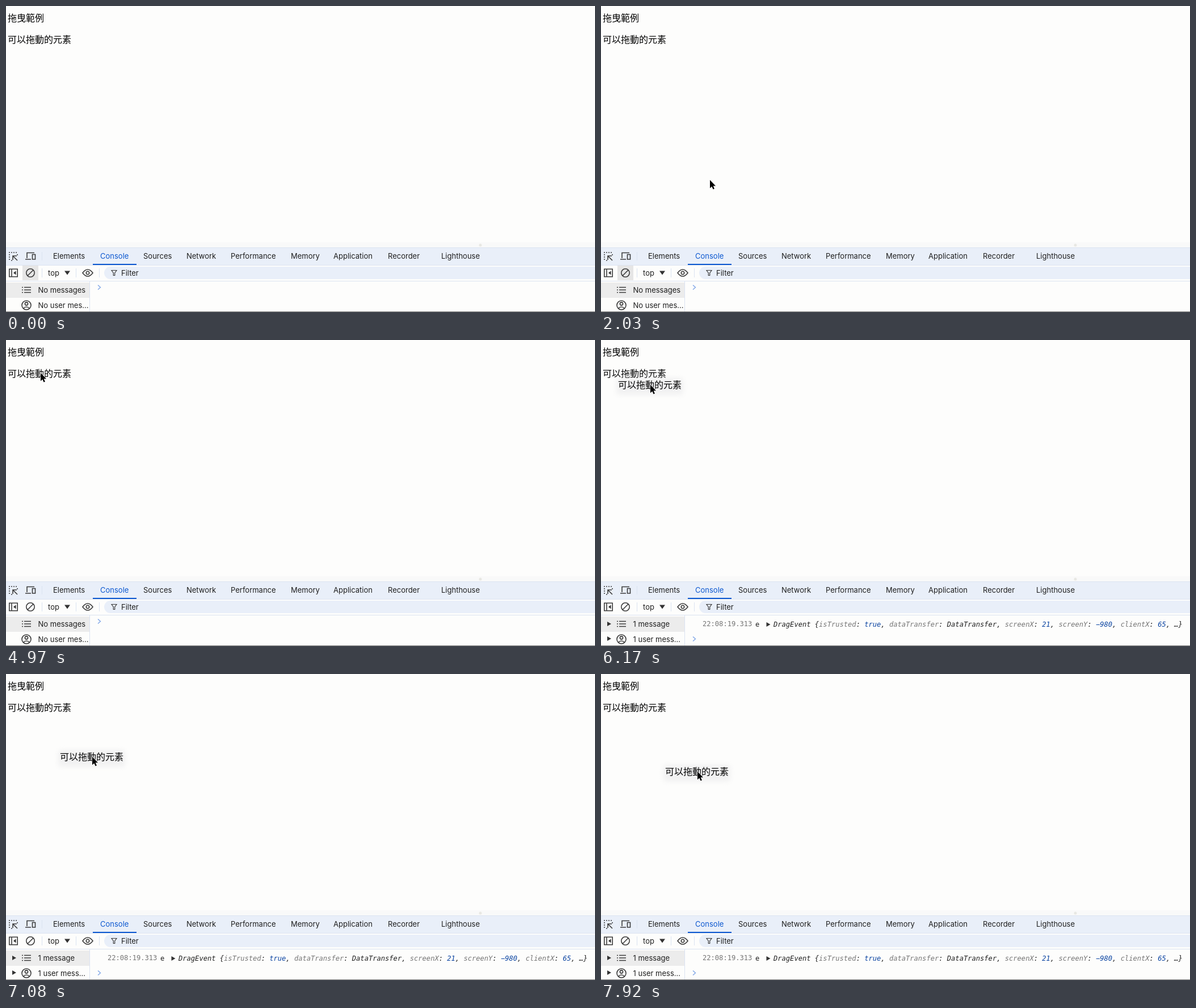
Write an HTML page that moves like this. It is 1038 px wide and 540 px high and loops after 8 s.

```html
<!DOCTYPE html>
<html lang="zh-Hant">
<head>
<meta charset="utf-8">
<title>拖曳範例</title>
<style>
  html, body { margin: 0; width: 100%; height: 100%; overflow: hidden; background: #fdfdfc; }
  svg { display: block; width: 100vw; height: 100vh; }
  text { white-space: pre; }
  .page { font: 500 16px "Noto Sans CJK TC", "Noto Sans CJK SC", "Noto Sans CJK JP", sans-serif; fill: #000; }
  #ghost .page { font-weight: 400; }
  .ui { font: 13px Inter, sans-serif; fill: #1f1f1f; }
  .log { font: 12.1px "DejaVu Sans Mono", monospace; fill: #1f1f1f; }
  .event { font-style: italic; }
  .key { fill: #757575; }
  .value { fill: #0842a0; }
  .icon { fill: none; stroke: #3c3c3c; stroke-width: 1.6; }
  .solid { fill: #333; }
  .line { fill: none; stroke: #dbe3f1; }
  .prompt { fill: none; stroke: #7ba3e6; stroke-width: 1.3; }
</style>
</head>
<body>
<svg viewBox="0 0 1038 540">
  <defs>
    <filter id="soft" x="-20%" y="-50%" width="140%" height="200%"><feGaussianBlur stdDeviation="4"/></filter>
    <path id="expander" class="solid" d="M0-4 7 0 0 4z"/>
  </defs>
  <rect width="1038" height="540" fill="#fdfdfc"/>
  <g class="page">
    <text x="3" y="27">拖曳範例</text>
    <text x="3" y="65">可以拖動的元素</text>
  </g>

  <!-- Developer tools: bars and dividers -->
  <rect y="417" width="1038" height="10" fill="#f9f9f9"/>
  <circle cx="836" cy="422" r="2.5" fill="#e8e8e4"/>
  <rect y="427" width="1038" height="30" fill="#e9eff9"/>
  <rect x="173" y="460" width="900" height="22" rx="11" fill="#e9eff9"/>
  <rect y="488" width="147" height="27" fill="#ececec"/>
  <rect id="hover" x="29" y="458" width="28" height="26" fill="#e6e6e6"/>
  <path class="line" d="M0 426.5H1038M0 457.5H1038M0 485.5H1038M147.5 486V539M63.5 434v15M63.5 463v16M123.5 463v16M164.5 463v16"/>
  <rect x="153" y="455" width="77" height="2" fill="#0b57d0"/>

  <!-- Toolbar icons -->
  <g class="icon">
    <path d="M5 435H21M6 438V450M20 438V442M9 449H12" stroke-dasharray="2 2"/>
    <path d="M20 449 12.5 441.5M12 448V441H19"/>
    <path d="M37 445V435.5H50M34 447H44M46.5 438.5h5v8.5h-5z"/>
    <path d="M5.8 464.3H20.2V477.7H5.8zM10 464V478"/>
    <circle cx="43" cy="471" r="7.2"/><path d="M38 476 48 466"/>
    <path d="M135 471Q144 459 153 471Q144 483 135 471z"/><circle cx="144" cy="471" r="2.7"/>
    <path d="M186 466.5H195L191.7 471V475.5H189.3V471z" stroke-width="1.2"/>
    <path d="M28 496.5h2M28 501h2M28 505.5h2M32 496.5H44M32 501H44M32 505.5H44"/>
    <circle cx="36" cy="528" r="8"/><circle cx="36" cy="525.5" r="2.6"/><path d="M30.5 533.5Q36 528.5 41.5 533.5"/>
  </g>
  <path class="solid" d="M17.5 467.5V474.5L13 471zM103 467.5H113L108 474.5z"/>

  <g class="ui">
    <g id="tabs"></g>
    <text x="74" y="476">top</text>
    <text x="203" y="476">Filter</text>
    <text id="total" x="56.5" y="506"></text>
    <text id="mine" x="56.5" y="533"></text>
  </g>
  <path id="prompt" class="prompt" d="M162-4 166.5 0 162 4"/>

  <g id="logged">
    <use href="#expander" x="11" y="501"/>
    <use href="#expander" x="11" y="527"/>
    <use href="#expander" x="291.5" y="502"/>
    <g class="log">
      <text class="key" x="179" y="505">22:08:19.313</text>
      <text x="272" y="506">e</text>
      <text id="event" class="event" x="304" y="506"></text>
    </g>
  </g>
  <rect y="539" width="1038" height="1" fill="#777"/>

  <g id="ghost">
    <rect x="-60" y="-12" width="118" height="30" rx="6" fill="#e4e4e6" opacity=".45" filter="url(#soft)"/>
    <text class="page" x="-57" y="6">可以拖動的元素</text>
  </g>
  <g id="cursor">
    <path id="arrow" d="M0 0V14.5L3.3 11.5 5.6 16.6 7.9 15.6 5.7 10.6H10z" stroke="#fff" stroke-width="1.2" paint-order="stroke"/>
  </g>
</svg>
<script>
const $ = id => document.getElementById(id);
const DURATION = 8000, CURSOR_IN = 1710, HOVER_END = 4230, DRAG_START = 5950;

// Cursor tip: time, x, y
const path = [
  [CURSOR_IN, 45, 468], [2030, 192, 307], [2450, 172, 183], [3430, 83, 108],
  [4130, 72, 77], [4970, 61, 58], [DRAG_START, 61, 58],
  [6660, 174, 151], [7600, 123, 138], [7920, 170, 172]
];

const tabs = {
  Elements: 83, Console: 166, Sources: 242, Network: 318, Performance: 396,
  Memory: 502, Application: 577, Recorder: 673, Lighthouse: 767
};
$('tabs').innerHTML = Object.entries(tabs).map(([name, x]) =>
  `<text x="${x}" y="446"${name === 'Console' ? ' fill="#0b57d0"' : ''}>${name}</text>`).join('');

const fields = [
  ['isTrusted', 'true', 'value'], ['dataTransfer', 'DataTransfer', ''],
  ['screenX', '21', 'value'], ['screenY', '−980', 'value'], ['clientX', '65', 'value']
];
$('event').innerHTML = 'DragEvent {' + fields.map(([key, value, style]) =>
  `<tspan class="key">${key}</tspan>: <tspan class="${style}">${value}</tspan>, `).join('') + '…}';

function position(t) {
  const next = path.findIndex(point => point[0] > t);
  if (next < 0) return path[path.length - 1].slice(1);
  if (next === 0) return path[0].slice(1);
  const [t0, x0, y0] = path[next - 1], [t1, x1, y1] = path[next];
  const u = (t - t0) / (t1 - t0), k = u * u * (3 - 2 * u);
  return [x0 + (x1 - x0) * k, y0 + (y1 - y0) * k].map(Math.round);
}

function show(id, visible) {
  $(id).style.display = visible ? '' : 'none';
}

function draw(now) {
  const t = now % DURATION, dragging = t >= DRAG_START;
  const place = `translate(${position(t)})`;
  $('cursor').setAttribute('transform', place);
  $('ghost').setAttribute('transform', place);
  show('cursor', t >= CURSOR_IN);
  show('ghost', dragging);
  show('logged', dragging);
  show('hover', t < HOVER_END);
  $('total').textContent = dragging ? '1 message' : 'No messages';
  $('mine').textContent = dragging ? '1 user mess…' : 'No user mes…';
  $('prompt').setAttribute('transform', `translate(0 ${dragging ? 527.5 : 496.5})`);
  requestAnimationFrame(draw);
}
requestAnimationFrame(draw);
</script>
</body>
</html>
```
